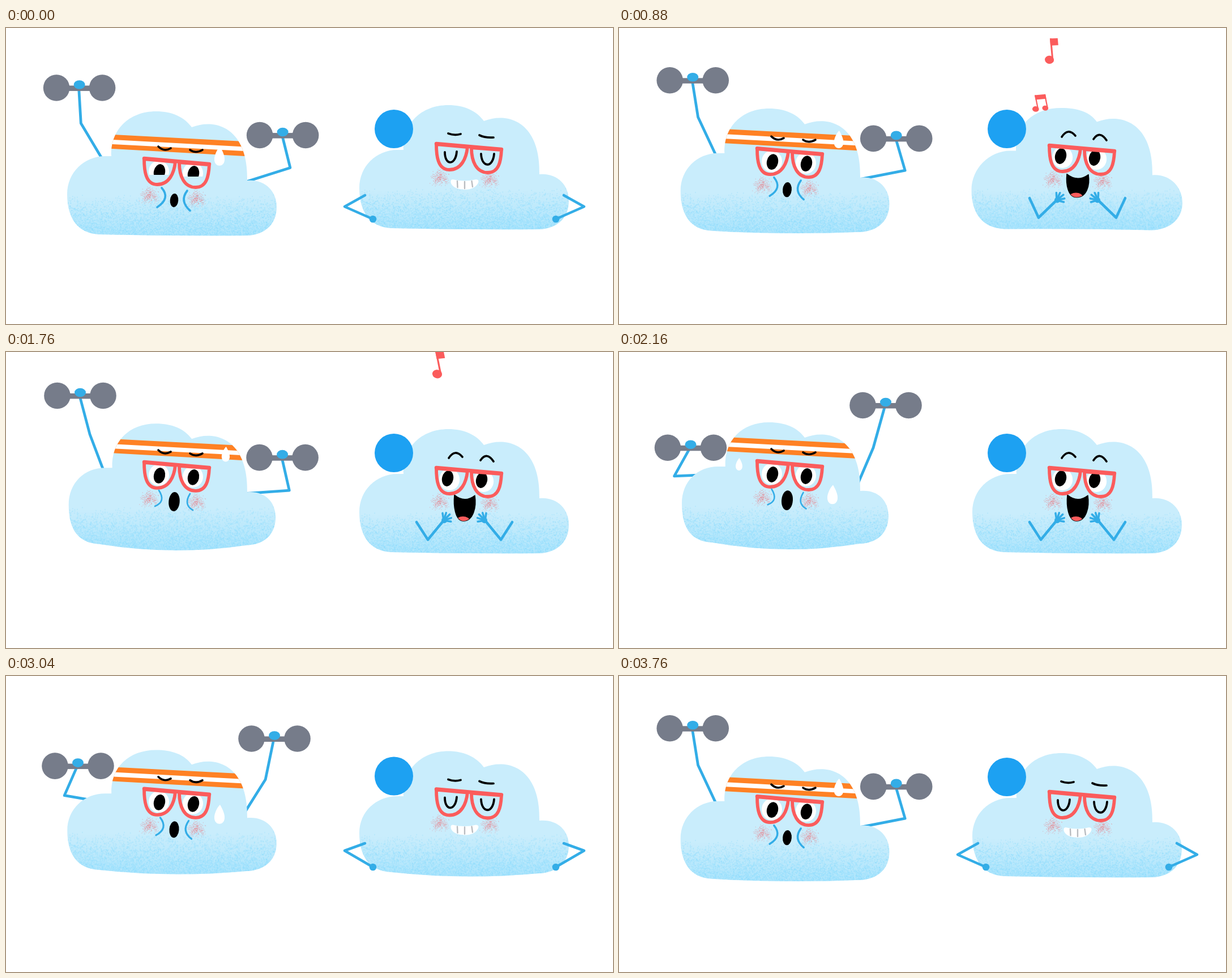
These frames come from a looping animation (1072 px wide and 522 px high, 3.84 s). An HTML page with a canvas:

```html
<!DOCTYPE html>
<html lang="en">
<head>
<meta charset="utf-8">
<title>Two clouds</title>
<style>
html, body { margin: 0; width: 100%; height: 100%; overflow: hidden; background: #fff; }
canvas { display: block; width: 1072px; height: 522px; }
</style>
</head>
<body>
<canvas id="stage" width="1072" height="522"></canvas>
<script>
const STEP = 80, LOOP = 3840, BEAT = 960;
const SKY = '#c9edfc', ARM = '#33ade7', STEEL = '#767c8a', ORANGE = '#ff8124', RED = '#fb5c5c';
const c = document.getElementById('stage').getContext('2d');

let seed = 7;
const rnd = () => (seed = (seed * 16807) % 2147483647) / 2147483647;

// ---- timing ----
const ramp = (t, a, b) => Math.max(0, Math.min(1, (t - a) / (b - a)));
const hill = (t, a, b) => Math.sin(Math.PI * ramp(t, a, b));
const mix = (a, b, k) => a.map((v, i) => v + (b[i] - v) * k);

// ---- drawing helpers ----
function layer(w, h, paint) {
  const el = document.createElement('canvas');
  el.width = w;
  el.height = h;
  paint(el.getContext('2d'));
  return el;
}
function group(x, y, draw) {
  c.save();
  c.translate(x, y);
  draw();
  c.restore();
}
function fill(d, color) {
  c.fillStyle = color;
  c.fill(d instanceof Path2D ? d : new Path2D(d));
}
function stroke(d, color, width) {
  c.strokeStyle = color;
  c.lineWidth = width;
  c.lineCap = c.lineJoin = 'round';
  c.stroke(d instanceof Path2D ? d : new Path2D(d));
}
function oval(x, y, rx, ry, color, turn = 0) {
  c.beginPath();
  c.ellipse(x, y, rx, ry, turn, 0, Math.PI * 2);
  c.fillStyle = color;
  c.fill();
}

// ---- grain: denser towards the bottom edge ----
const grain = layer(420, 110, g => {
  const shade = g.createLinearGradient(0, 35, 0, 105);
  shade.addColorStop(0, 'rgba(148,221,252,0)');
  shade.addColorStop(1, 'rgba(148,221,252,.5)');
  g.fillStyle = shade;
  g.fillRect(0, 0, 420, 110);
  g.fillStyle = 'rgba(140,218,252,.36)';
  for (let i = 0; i < 6000; i++) {
    g.fillRect(rnd() * 420, 108 - 78 * (1 - Math.sqrt(rnd())), 1.7, 1.7);
  }
});
const blush = layer(40, 40, g => {
  g.fillStyle = 'rgba(238,112,120,.4)';
  const spread = () => 20 + 13 * (rnd() + rnd() + rnd() - 1.5);
  for (let i = 0; i < 230; i++) g.fillRect(spread(), spread(), 1.2, 1.2);
});
const cheek = (x, y) => c.drawImage(blush, x - 20, y - 20);

// ---- shared parts ----
function cloudPath({ top, sh, corner, mid, pinch }) {
  const side = (sh + corner) / 2 - 1.5 * Math.min(0, pinch);
  const l = 108 + pinch, r = 478 - pinch * .7, h = 186 + pinch * .6;
  return new Path2D(`M165 ${364 + corner}
    C124 ${362 + corner} ${l} ${332 + side} ${l} ${293 + side}
    C${l} ${255 + side} 138 ${226 + sh} 175 ${226 + sh}
    L${h} ${226 + sh}
    C${h - 2} ${180 + sh} 217 ${147 + top} 265 ${147 + top}
    C293 ${147 + top} 315 ${157 + sh} 328 ${175 + sh}
    C372 ${158 + sh} 428 ${178 + sh} 426 ${269 + sh}
    C455 ${266 + sh} ${r} ${286 + side} ${r} ${315 + side}
    C${r} ${348 + corner} 455 ${365 + corner} 425 ${366 + corner}
    Q295 ${367 + 2 * mid - corner} 165 ${364 + corner}Z`);
}
function cloud(pose, extra) {
  const path = cloudPath(pose);
  fill(path, SKY);
  c.save();
  c.clip(path);
  c.drawImage(grain, 85, 263 + (pose.corner + pose.mid) / 2);
  if (extra) extra();
  c.restore();
}

const LENSES = [
  new Path2D('M244 231 L299 236 C297 256 288 276 267 276 C246 276 244 250 244 231Z'),
  new Path2D('M306 237 L359 241 C358 262 354 281 335 281 C315 281 306 262 306 237Z')
];
function openEyes(dx, dy, lid) {
  LENSES.forEach((lens, i) => {
    const x = 271 + 60 * i, y = 254 + 3 * i;
    c.save();
    c.clip(lens);
    c.beginPath();
    c.rect(x - 40, y - 40, 80, 40 + lid);
    c.clip();
    oval(x + dx * .4 - 1, y + dy * .4 - 1, 18, 19, '#fff');
    oval(x + dx, y + dy, 10, 14, '#000', .2);
    c.restore();
  });
}
function glasses() {
  LENSES.forEach(lens => stroke(lens, RED, 5.8));
  stroke('M244 230 L359 240', RED, 6.5);
}

// ---- weightlifter ----
// One arm's cycle: 0 is raised, 1 is lowered. The other arm runs half a beat later.
const LOWERED = [.28, .53, .8, .9, .95, 1.04, .98, .47, .17, 0, 0, .15];
const HOP = [0, .13, .82, 1, .95, .47];
const CROUCH = [0, 1, .25, 0, 0, 0];

function liftPose(step) {
  const h = HOP[step % 6], q = CROUCH[step % 6], body = h * h;
  return {
    top: -23 * body - 4 * q,
    sh: -24 * body - 10 * q,
    corner: -28 * body - 13 * q,
    mid: -18 * body - 18 * q,
    pinch: 3 * body - 7 * q,
    face: -38 * h,
    band: -38 * Math.pow(h, 1.8) - 4 * q,
    puff: .9 * q - 1.1 * body,
    lid: h > .3 ? 30 : 5 - 5 * q
  };
}
function liftArm(sx, sy, ex, gap, x, y) {
  stroke(`M${sx} ${sy} L${ex} ${y + gap} L${x - 1} ${y}`, ARM, 4.8);
  c.fillStyle = STEEL;
  c.fillRect(x - 30, y - 4, 60, 9.5);
  oval(x - 40.5, y, 23.3, 23.3, STEEL);
  oval(x + 40.5, y, 23.3, 23.3, STEEL);
  oval(x, y - 5.5, 10, 7.8, ARM);
}
function sweat(t, born, hold, life, draw) {
  const age = (t - born + BEAT) % BEAT;
  if (age >= life) return;
  const k = ramp(age, hold, hold + 560), [x, y] = draw(k, 1 - (1 - k) ** 2);
  const size = Math.min(1, .65 + age / 600);
  c.save();
  c.globalAlpha = Math.min(1, (life - age) / 200);
  c.translate(x, y);
  c.scale(size, size);
  fill('M1 -17 C5 -10 10 0 9 7 C8 20 -8 20 -9 7 C-10 0 -4 -13 1 -17Z', '#fff');
  c.restore();
}
function headband(dy) {
  const strip = (a, b, d, e, color) =>
    fill(`M170 ${a + dy - 1} L440 ${d + dy + 1} V${e + dy + 1} L170 ${b + dy - 1}Z`, color);
  strip(188, 213, 200, 226, ORANGE);
  strip(197, 205, 209.5, 217, '#fff');
}
function lifterFace({ face, puff: k, lid }) {
  group(0, face, () => {
    stroke('M269 209 Q279 219 291 212', '#000', 3.6);
    stroke('M325 215 Q335 222 347 215', '#000', 3.6);
    cheek(253, 295);
    cheek(336, 301);
    openEyes(0, 0, lid);
    glasses();
    const w = 3.7 + k;
    stroke(`M${275 + 5 * k} ${282 + 2 * k} Q${291 + 8 * k} 300 ${267 + 4 * k} ${316 + 8 * k}`, ARM, w);
    stroke(`M${320 - 5 * k} ${287 + k} Q${306 - 7 * k} 305 ${325 - 5 * k} ${322 + 7 * k}`, ARM, w);
    oval(297, 304 + 4 * k, 7.3 - 2.4 * k, 12 - 5 * k, '#000', .08);
  });
}
function lifter(t) {
  const step = t / STEP % 12, p = liftPose(step), u = LOWERED[step], v = LOWERED[(step + 6) % 12];
  liftArm(172 - 26 * u * u, 230 + p.sh + 13 * u * u, 148 - 56 * u, 68 - 20 * u, 131 - 5 * u, 77 + 102 * u);
  liftArm(422, 256 + p.sh + 16 * v, 449 + 54 * v, 75 - 18 * v, 471 + 18 * v, 94 + 97 * v);
  cloud(p, () => headband(p.band));
  lifterFace(p);
  sweat(t, 720, 160, 800, (k, fall) => [388 - 11 * Math.min(1, 7 * k), 202 + p.sh + 90 * fall]);
  sweat(t, 240, 0, 500, (k, fall) => [212, 222 + p.sh + 40 * fall]);
}

// ---- listener ----
// shoulder, elbow, hand of the left arm; the right one is its mirror image
const HIPS = [634, 295, 598, 315, 648, 337];
const LOW = [652, 316, 638, 363, 717, 323];
const CLAP = [725, 300, 745, 331, 773, 297];
// start, lean, paired
const NOTES = [[480, .1, false], [880, -.2, true], [1280, .2, false]];

const bob = t => t >= 800 && t < 1680 ? (1 + Math.cos((t - 1280) / 160 * Math.PI)) / 2 : 0;

function listenPose(t, dip) {
  const lift = hill(t, 560, 800) + hill(t, 2240, 3200);
  return {
    top: 10 * dip - 7 * lift,
    sh: 3 * dip - 6 * lift,
    face: 6 * dip - 9 * lift,
    corner: 3 * dip - 14 * lift,
    mid: -dip - 3 * lift,
    pinch: -3 * dip
  };
}
function listenArms(t, dip, top) {
  const raised = ramp(t, 560, 800) - ramp(t, 2240, 2720);
  const arm = raised < .5 ? mix(HIPS, LOW, raised * 2) : mix(LOW, CLAP, raised * 2 - 1);
  const [sx, sy, ex, ey, x, y] = arm;
  const elbow = [ex - 8 * dip, ey + 7 * dip + 2 * Math.min(0, top)], hand = [x, y + 13 * dip];
  for (const flip of [false, true]) {
    c.save();
    if (flip) {
      c.translate(1619, 0);
      c.scale(-1, 1);
    }
    stroke(`M${sx} ${sy} L${elbow} L${hand}`, ARM, 4.6);
    if (raised > .8) {
      const aim = Math.atan2(hand[1] - elbow[1], hand[0] - elbow[0]);
      for (let i = 0; i < 5; i++) {
        const a = aim + (i - 1.8) * .47, len = 15 - Math.abs(i - 2);
        stroke(`M${hand} l${len * Math.cos(a)} ${len * Math.sin(a)}`, ARM, 3.6);
      }
      oval(hand[0] + 1, hand[1], 5, 5, ARM);
    } else {
      oval(x, y, 6.3, 6.3, ARM);
    }
    c.restore();
  }
}
function grin() {
  fill('M789 267 Q810 272 830 267 Q836 267 834 273 Q828 285 810 285 Q790 284 786 274 Q784 267 789 267Z', '#fff');
  stroke('M797 270 L797.5 281 M810 271 V283 M822.5 270 L824 280', '#b9bcc0', 2.4);
}
function smile(dip) {
  const top = 252 + 5 * dip, low = 298 - 5 * dip, w = 2 * dip;
  const mouth = new Path2D(`M${792 - w} ${top} Q810 ${top + 15} ${828 + w} ${top + 1}
    C${831 + w} ${top + 20} 826 ${low} 808 ${low} C793 ${low} ${790 - w} ${top + 18} ${792 - w} ${top}Z`);
  stroke(mouth, '#000', 1.5);
  fill(mouth, '#000');
  c.save();
  c.clip(mouth);
  oval(807, low, 12, 8, RED);
  c.restore();
}
function listenFace(t, { top, face }, dip) {
  const awake = t >= 640 && t < 2240;
  group(0, top, () => {
    const brows = awake
      ? 'M782 187 Q793 170 806 185 M838 191 Q849 175 861 193'
      : 'M781 186 Q792 190 803 187 M836 189 Q846 194 861 193';
    stroke(brows, '#000', 3.7);
  });
  group(0, face, () => {
    cheek(766, 264);
    cheek(854, 267);
    if (awake) {
      smile(dip);
    } else {
      stroke('M775 219 C775 243 794 243 796 218', '#000', 3.8);
      stroke('M839 222 C840 247 860 247 862 222', '#000', 3.8);
      grin();
    }
    group(516, -26, () => {
      if (awake) openEyes(-7, -5, 40);
      glasses();
    });
  });
}
function note(t, [start, lean, paired]) {
  const age = t - start;
  if (age < 0 || age > 760) return;
  const size = 1 + age / 1050, skew = lean * Math.cos(age / 150);
  c.save();
  c.translate(743 + 20 * Math.min(1, age / 300), 133 - .2275 * age);
  c.transform(size, size * skew * .5, -size * skew, size, 0, 0);
  c.fillStyle = RED;
  if (paired) {
    c.fillRect(-6, -15, 19, 8);
    c.fillRect(-6, -15, 2.2, 24);
    c.fillRect(10.8, -15, 2.2, 24);
    oval(-9, 9, 5.8, 4.8, RED);
    oval(8, 9, 5.3, 4.5, RED);
  } else {
    c.fillRect(0, -17, 10, 9);
    c.fillRect(0, -17, 2.2, 27);
    oval(-3, 10, 5.8, 5.2, RED);
  }
  c.restore();
}
function listener(t) {
  const dip = bob(t), p = listenPose(t, dip);
  group(516, -11, () => cloud(p));
  oval(685, 178 + Math.min(0, p.sh * .5), 34, 34, '#1da1f2');
  listenFace(t, p, dip);
  listenArms(t, dip, p.top);
  NOTES.forEach(n => note(t, n));
}

// ---- loop ----
const begin = performance.now();
function frame() {
  const t = Math.floor(((performance.now() - begin) % LOOP) / STEP) * STEP;
  c.fillStyle = '#fff';
  c.fillRect(0, 0, 1072, 522);
  lifter(t);
  listener(t);
  requestAnimationFrame(frame);
}
frame();
</script>
</body>
</html>
```
